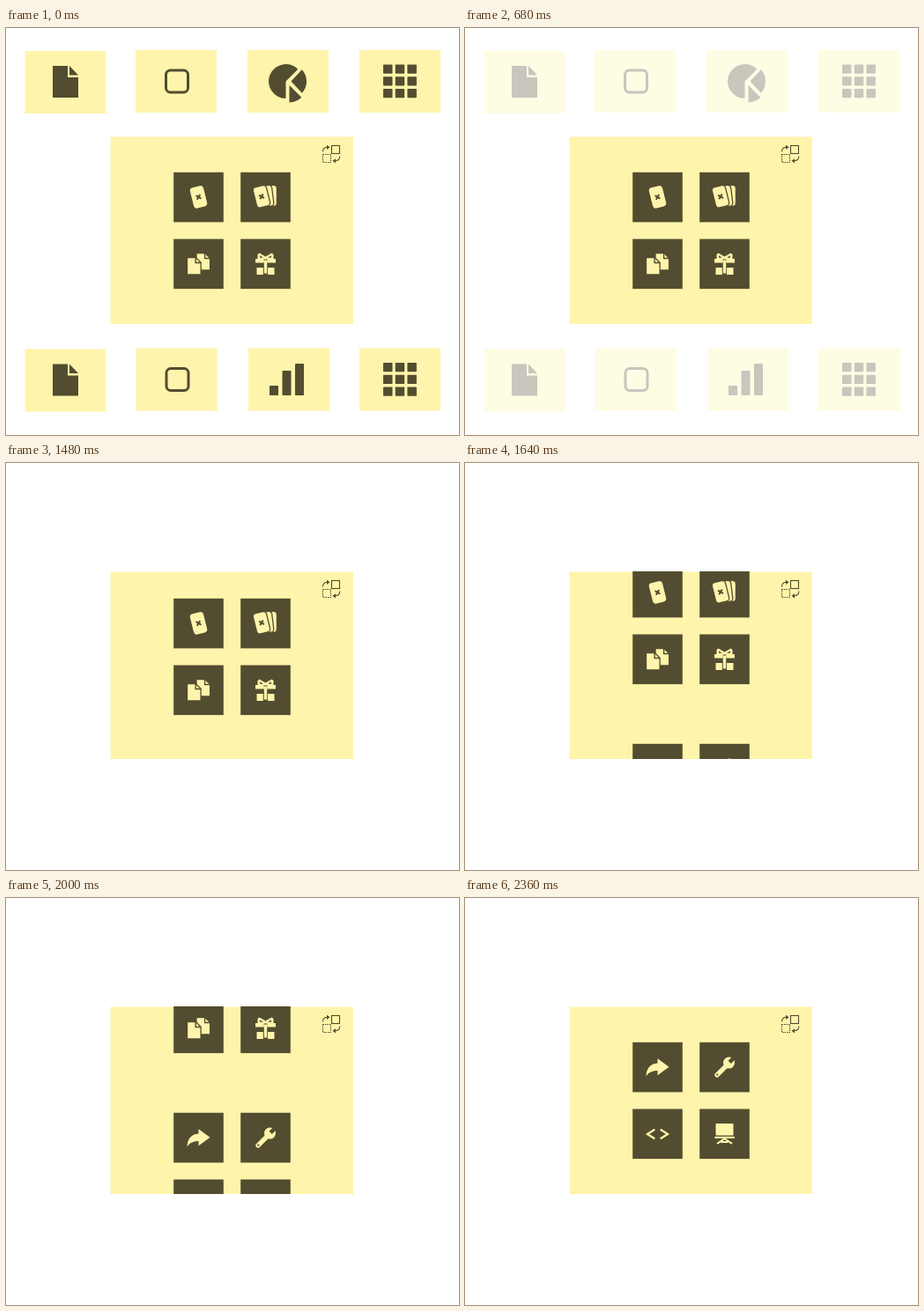
Recreate the animation shown at these times as an HTML page. Size 514 by 462 pixels, loop 2400 ms.

```html
<!DOCTYPE html>
<html lang="en">
<head>
<meta charset="utf-8">
<title>Tile panel</title>
<style>
  html, body { margin: 0; width: 100%; height: 100%; overflow: hidden; background: #fff; }
  svg { display: block; }
  .pale { fill: #fff4ab; }
  .dark { fill: #524d30; }
  .line { fill: none; stroke: #524d30; }
  .glow { fill: none; stroke: #fff4ab; }
  .edged { fill: #fff4ab; stroke: #524d30; stroke-width: 1.3; }
</style>
</head>
<body>
<svg id="stage" width="514" height="462" viewBox="0 0 514 462">
  <defs>
    <clipPath id="window"><rect x="118.5" y="123.5" width="275.5" height="212.5"/></clipPath>
  </defs>
  <g id="outer"></g>
  <rect class="pale" x="118.5" y="123.5" width="275.5" height="212.5"/>
  <g clip-path="url(#window)"><g id="tiles"></g></g>
  <g class="line" stroke-width="1.1">
    <rect x="369.5" y="133.5" width="9" height="9"/>
    <rect x="359.5" y="143.5" width="9" height="9" stroke-dasharray="1.5 1"/>
    <path d="M359.5 140.5C359.5 137 361.5 135.3 365 135.3M378.8 145.5C378.8 149 377 150.8 373 150.8"/>
    <path class="dark" stroke="none" d="M364 132.7L367.5 135.3L364 137.9ZM374 148.2L370.5 150.8L374 153.4Z"/>
  </g>
</svg>
<script>
const LOOP = 2400, STEP = 40;
const $ = id => document.getElementById(id);

const rect = (x, y, w, h, cls, r = 0) =>
  `<rect class="${cls}" x="${x}" y="${y}" width="${w}" height="${h}" rx="${r}"/>`;
const path = (d, cls, w = 1) => `<path class="${cls}" stroke-width="${w}" d="${d}"/>`;
const at = (x, y, body) => `<g transform="translate(${x} ${y})">${body}</g>`;

// Icons of the outer cards, placed relative to each card's corner
const file = path('M31.5 17H48.5V30H60.5V53H31.5ZM50.5 17L60.5 27.5H50.5Z', 'dark');
const box = rect(34.5, 23, 25, 25, 'line" stroke-width="3', 5);
const pie = path('M43.5 35.5L57.3 21.7A19.5 19.5 0 1 0 43.5 55Z' +
  'M49.5 35.5L61.8 22.2A19.5 19.5 0 0 1 61.8 48.8Z' +
  'M47.5 40L61.3 53.8A19.5 19.5 0 0 1 47.5 59.5Z', 'dark');
const bars = [[24, 42.5, 11], [38.5, 25.5, 28], [53, 17.5, 36]]
  .map(([x, y, h]) => rect(x, y, 10, h, 'dark', .8)).join('');
const grid = Array.from({ length: 9 }, (_, i) =>
  rect(27 + i % 3 * 13.7, 16.5 + Math.floor(i / 3) * 13.7, 10.5, 10.3, 'dark', .8)).join('');

const card = (x, y, icon) => at(x, y, rect(0, 0, 92, 71, 'pale') + icon);
$('outer').innerHTML =
  card(21.5, 26, file) + card(147, 25, box) + card(274, 25, pie) + card(401, 25, grid) +
  card(21.5, 364.5, file) + card(147.5, 363.5, box) + card(275, 363.5, bars) + card(401, 363.5, grid);

// Icons of the scrolling tiles
const leaf = (x, y, turn, cls = 'edged', body = '') =>
  `<g transform="translate(${x} ${y}) rotate(${turn})">${rect(-7.8, -12, 15.6, 24, cls, 3.6)}${body}</g>`;
const cross = path('M-2.4 -2.4L2.4 2.4M2.4 -2.4L-2.4 2.4', 'line', 2);
const sheet = (x, y) => at(x, y,
  path('M0 0H9.8L15.6 5.8V19.5H0Z', 'edged', 1.3) + path('M9.6 0V6H15.6', 'line', 1.4));

const single = leaf(28.5, 28, -14, 'pale', cross);
const stack = leaf(33.6, 26.5, 0) + leaf(29, 27, -7) + leaf(24, 27.5, -14, 'edged', cross);
const copies = sheet(26, 16) + sheet(15.5, 21);
const gift = path('M27 22.5L19.5 22.5V17.5L21.5 16L28.5 20L35.5 16L37.5 17.5V22.5H40V27H30.4V23H26.6V27H17V22.5Z' +
  'M26.8 24H30.2V39H26.8ZM18.5 32.5H25.8V40.5H18.5ZM31 32.5H38.5V40.5H31Z', 'pale') +
  path('M22 18.8L26 21.2H22ZM35 18.8L31 21.2H35Z', 'dark');
const share = path('M28.5 18.5L41.5 28L28.5 37.5V32.3C22 32.3 18 34.5 15.5 39C15.5 30 20 24 28.5 23.6Z', 'pale');
const wrench = path('M20 37L32.5 24.5', 'glow" stroke-linecap="round', 5.4) +
  '<circle class="pale" cx="33.5" cy="23.3" r="6.5"/>' +
  path('M34.2 22.6L41 15.8', 'line', 4.6) +
  '<circle class="dark" cx="20.3" cy="36.8" r="1.1"/>';
const code = path('M25.3 23.2L17 28.5L25.3 33.8M31.7 23.2L40 28.5L31.7 33.8', 'glow', 2.3);
const board = rect(18.5, 16.5, 20, 13.5, 'pale', .8) + rect(17.3, 31.3, 22.4, 2, 'pale') +
  path('M20 39.3L29.5 33M37 39.3L27.5 33M24.5 37.5H32.5', 'glow', 2);

const tile = (x, y, icon) => at(x, y, rect(.2, 0, 56.6, 56.6, 'dark') + icon);
const page = (y, a, b, c, d) =>
  tile(190, y, a) + tile(266, y, b) + tile(190, y + 75.7, c) + tile(266, y + 75.7, d);
$('tiles').innerHTML = page(163.8, single, stack, copies, gift) + page(363.8, share, wrench, code, board);

// Motion: [time, scroll] pairs, moving in 5 px units
const scroll = [[0, 0], [1440, 0], [1480, 10], [1840, 85], [2160, 155], [2360, 200]];
function scrollAt(t) {
  const i = Math.max(1, scroll.findIndex(([time]) => time >= t));
  const [t0, y0] = scroll[i - 1], [t1, y1] = scroll[i];
  return Math.round((y0 + (y1 - y0) * (t - t0) / (t1 - t0)) / 5) * 5;
}
const fadeAt = t => t >= 1280 ? 0 : 1 - Math.min(t, 960) / 1000;

function play(el, pose) {
  const n = LOOP / STEP;
  const frames = Array.from({ length: n + 1 }, (_, i) =>
    ({ ...pose(i % n * STEP), offset: i / n, easing: 'step-end' }));
  el.animate(frames, { duration: LOOP, iterations: Infinity });
}
play($('outer'), t => ({ opacity: fadeAt(t) }));
play($('tiles'), t => ({ transform: `translateY(${-scrollAt(t)}px)` }));
</script>
</body>
</html>
```
